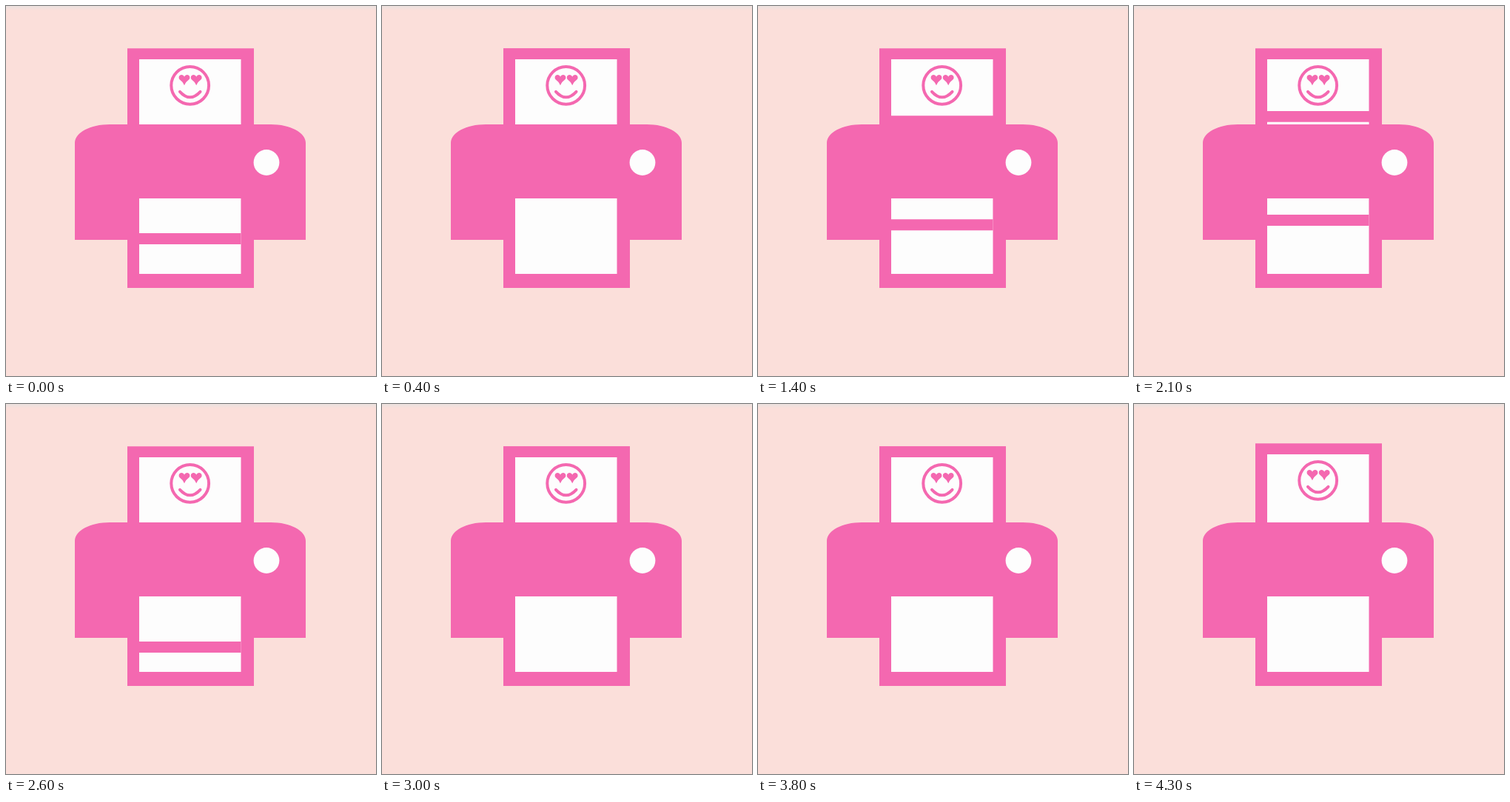
Write an HTML page that moves like this. It is 500x500 px and loops after 4400 ms.

```html
<!DOCTYPE html>
<html lang="en">
<head>
<meta charset="utf-8">
<title>Printer</title>
<style>
  html, body { margin: 0; width: 100%; height: 100%; overflow: hidden; background: #fbdfda; }
  svg { display: block; width: 100%; height: 100%; }
</style>
</head>
<body>
<svg viewBox="0 0 500 500">
  <defs>
    <linearGradient id="edge" x2="0" y2="1">
      <stop offset="0.3" stop-color="#eee1de"/>
      <stop offset="1" stop-color="#fbdfda"/>
    </linearGradient>
    <clipPath id="inlet"><path d="M0 0H500V161H0Z"/></clipPath>
    <clipPath id="outlet"><path d="M180 260H317.5V362H180Z"/></clipPath>
    <path id="heart" d="M0 7.2C-3-.2-7.4.5-7.4-3.4C-7.4-8-1.4-8.4 0-4.4C1.4-8.4 7.4-8 7.4-3.4C7.4.5 3-.2 0 7.2Z" fill="#f468b0"/>
    <!-- Sheet drawn with its top edge at y = 0 -->
    <g id="sheet">
      <path d="M164 0H335V155H164Z" fill="#f468b0"/>
      <path d="M180 14.7H317.5V140H180Z" fill="#fdfdfd"/>
    </g>
    <g id="face">
      <g fill="none" stroke="#f468b0" stroke-width="4">
        <circle cx="248.7" cy="50" r="25.4"/>
        <path d="M235 58.5Q248.7 73.5 262.5 58.5" stroke-linecap="round"/>
      </g>
      <use href="#heart" x="241" y="42.8"/>
      <use href="#heart" x="257.2" y="42.8"/>
    </g>
  </defs>

  <path d="M0 0H500V500H0Z" fill="#fbdfda"/>
  <path d="M0 0H500V6H0Z" fill="url(#edge)"/>

  <g clip-path="url(#inlet)">
    <g transform="translate(0 57.3)"><use href="#sheet"/><use href="#face"/></g>
    <g class="moving"><use href="#sheet"/><use href="#face"/></g>
  </g>

  <path d="M93 316V185C93 171 114 160 140 160H358C384 160 405 171 405 185V316H335V381H164V316Z" fill="#f468b0"/>
  <circle cx="352" cy="211.5" r="17.4" fill="#fdfdfd"/>

  <path d="M180 260H317.5V362H180Z" fill="#fdfdfd"/>
  <g clip-path="url(#outlet)">
    <g class="moving"><use href="#sheet"/></g>
  </g>
</svg>
<script>
  const LOOP = 4400, STEP = 100, FEED = 660;
  // [ms within one feed, top edge of the moving sheet]
  const keys = [
    [0, 167], [80, 148.3], [120, 142], [140, 138.3], [200, 105], [260, 72],
    [300, 60], [320, 54], [340, 53.3], [360, 57.3], [540, 57.3], [541, 212],
    [600, 188], [660, 167]
  ];
  const moving = document.querySelectorAll('.moving');

  function sheetTop(ms) {
    const i = keys.findIndex(k => k[0] > ms);
    const [t0, y0] = keys[i - 1], [t1, y1] = keys[i];
    return y0 + (y1 - y0) * (ms - t0) / (t1 - t0);
  }

  function draw(time) {
    const t = Math.floor(time % LOOP / STEP) * STEP;
    const y = sheetTop(t % FEED);
    for (const g of moving) g.setAttribute('transform', `translate(0 ${y})`);
  }

  let start;
  function tick(now) {
    start ??= now;
    draw(now - start);
    requestAnimationFrame(tick);
  }
  draw(0);
  requestAnimationFrame(tick);
</script>
</body>
</html>
```
